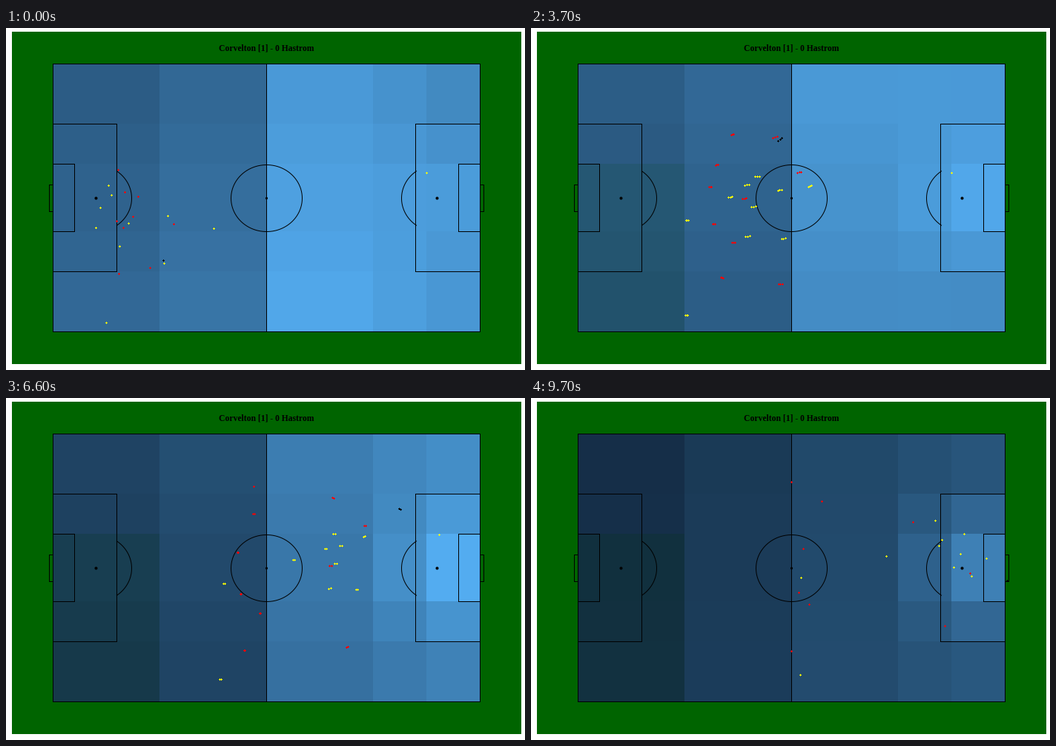
A matplotlib script that plays this animation: 700 by 461 pixels, repeating every 10 s.

```python
import matplotlib.pyplot as plt
import numpy as np
from matplotlib.animation import FuncAnimation
from matplotlib.collections import PolyCollection
from matplotlib.colors import LinearSegmentedColormap
from matplotlib.patches import Circle, Rectangle

W, H, DPI = 700, 461, 64
PX = 72 / DPI  # one pixel in points
FRAMES, LAST = 100, 97
X_EDGES = (63, 207, 351, 495, 567, 639)
Y_EDGES = (48, 129, 183, 274, 328, 409)
MID_Y = 229
BLUES = LinearSegmentedColormap.from_list(
    "blues", ["#132B43", "#224A6C", "#336A98", "#448DC6", "#56B1F7"])
TEAL = np.array([-4, 0, -11]) / 255

fig = plt.figure(figsize=(W / DPI, H / DPI), dpi=DPI, facecolor="white")
ax = fig.add_axes([0, 0, 1, 1])
ax.set_xlim(0, W)
ax.set_ylim(H, 0)
ax.axis("off")


def box(x0, y0, x1, y1, **style):
    style = {"lw": PX, "ec": "black", "fc": "none", **style}
    return ax.add_patch(Rectangle((x0, y0), x1 - x0, y1 - y0, aa=False, **style))


def arc(cx, half_angle, facing=0):
    a = facing + np.linspace(-half_angle, half_angle, 181)
    ax.plot(cx + 0.5 + 48 * np.cos(a), MID_Y + 0.5 + 45 * np.sin(a),
            color="black", lw=PX)


# Pitch
box(8, 5, 695, 453, fc="#006400", lw=0)
cells = [[box(x0, y0, x1, y1, lw=0) for x0, x1 in zip(X_EDGES, X_EDGES[1:])]
         for y0, y1 in zip(Y_EDGES, Y_EDGES[1:])]
box(63, 48, 639, 409)
for near, goal, small, large in ((63, 58, 92, 149), (639, 644, 610, 552)):
    box(near, 129, large, 328)
    box(near, 183, small, 274)
    box(near, 211, goal, 247)
ax.plot([351, 351], [48, 409], color="black", lw=PX, aa=False)
box_angle = np.arccos(28 / 48)
arc(351, np.pi)
arc(121, box_angle)
arc(581, box_angle, np.pi)
for x, r in ((121, 2), (351, 1.6), (581, 2)):
    ax.add_patch(Circle((x + 0.5, MID_Y + 0.5), r, fc="black", lw=0))
ax.text(351, 31, "Corvelton [1] - 0 Hastrom", ha="center", va="baseline",
        family="Liberation Serif", weight="bold", size=11.6 * PX)


# The ball and the far keeper move straight between a few points
def ball(t):
    keys = (0, 27, 41, 57, 66, 84, 97)
    return np.array([np.interp(t, keys, (212, 297, 351, 486, 532, 560, 642)),
                     np.interp(t, keys, (313, 180, 138, 145, 149, 181, 246))])


def keeper(t):
    keys = (48, 66, 84, 97)
    return np.array([np.interp(t, keys, (567, 584, 609, 614)),
                     np.interp(t, keys, (195, 184, 206, 216))])


# Every other player runs one curve through start, middle and end
RUN_KEYS = (0, 41, 97)
REDS = [
    ((151, 191), (283, 139), (351, 113)),
    ((178, 227), (346, 142), (515, 167)),
    ((226, 264), (379, 189), (584, 183)),
    ((142, 225), (263, 180), (392, 139)),
    ((160, 221), (252, 213), (367, 203)),
    ((171, 254), (306, 228), (592, 236)),
    ((149, 260), (257, 264), (361, 262)),
    ((158, 269), (285, 290), (375, 278)),
    ((152, 331), (268, 337), (351, 341)),
    ((194, 323), (354, 345), (558, 307)),
]
YELLOWS = [
    ((138, 212), (325, 198), (545, 165)),
    ((142, 225), (310, 210), (550, 199)),
    ((218, 253), (351, 215), (554, 191)),
    ((165, 263), (319, 238), (579, 210)),
    ((280, 270), (390, 208), (584, 183)),
    ((153, 294), (311, 278), (570, 228)),
    ((213, 317), (358, 280), (594, 240)),
    ((127, 242), (286, 226), (479, 213)),
    ((121, 269), (222, 258), (364, 242)),
    ((135, 397), (220, 386), (363, 373)),
]
runs = np.array(REDS + YELLOWS, float)
curves = np.polyfit(RUN_KEYS, runs.transpose(1, 0, 2).reshape(3, -1), 2)
COLORS = ["red"] * len(REDS) + ["yellow"] * (len(YELLOWS) + 1) + ["black"]


def positions(t):
    w = t - 7e-5 * t * (t - 41) * (t - 97)  # slow start, then a surge
    players = (curves[0] * w * w + curves[1] * w + curves[2]).reshape(-1, 2)
    return np.vstack([players, keeper(t), ball(t)])


def zone_values(t):
    """Zones fade as the ball advances, lean to its side and peak at the goal."""
    bx, by = ball(t)
    keys = (212, 297, 351, 486, 560, 642)
    back = np.interp(bx, keys, (.44, .39, .34, .21, .12, .04))
    centre = np.interp(bx, keys, (.88, .93, .73, .69, .53, .25))
    front = np.interp(bx, keys, (.80, .87, .83, .86, .77, .46))
    level = np.array([back, back + .09, centre, (centre + front) / 2, front])
    row = np.arange(-2, 3)[:, None]
    lean = 0.0011 * (by - MID_Y) * row / 4
    peak = np.exp(-row ** 2 / 1.2) - .39
    pull = (.08 + .24 * (bx - 212) / 430) * np.array([0, 0, 0, .4, 1])
    return np.clip(level + lean + peak * pull, 0, 1)


def paint_zones(t):
    values = zone_values(t)
    for i, row in enumerate(cells):
        for j, cell in enumerate(row):
            rgb = np.array(BLUES(values[i, j])[:3])
            if j == 0 and i > 1:
                rgb = rgb + TEAL * min(t / 27, 1)
            cell.set_facecolor(np.clip(rgb, 0, 1))


# A three pixel plus sign
PLUS = np.array([(1, 0), (2, 0), (2, 1), (3, 1), (3, 2), (2, 2),
                 (2, 3), (1, 3), (1, 2), (0, 2), (0, 1), (1, 1)]) - 1
dots = PolyCollection([], linewidths=0, edgecolors="none", zorder=5)
ax.add_collection(dots, autolim=False)
TRAIL = (1, 2, 3, 2, 2)


def draw(frame):
    t = min(frame, LAST)
    paint_zones(t)
    count = 1 if t == LAST else TRAIL[t % len(TRAIL)]
    times = np.clip(t + 0.6 * (np.arange(count) - (count - 1) / 2), 0, LAST)
    spots = np.round([positions(s) for s in times]).transpose(1, 0, 2)
    dots.set_verts([PLUS + p for p in spots.reshape(-1, 2)])
    dots.set_facecolor(np.repeat(COLORS, count).tolist())
    return [dots]


anim = FuncAnimation(fig, draw, frames=FRAMES, interval=100, repeat=True,
                     repeat_delay=0, blit=False)
plt.show()
```
